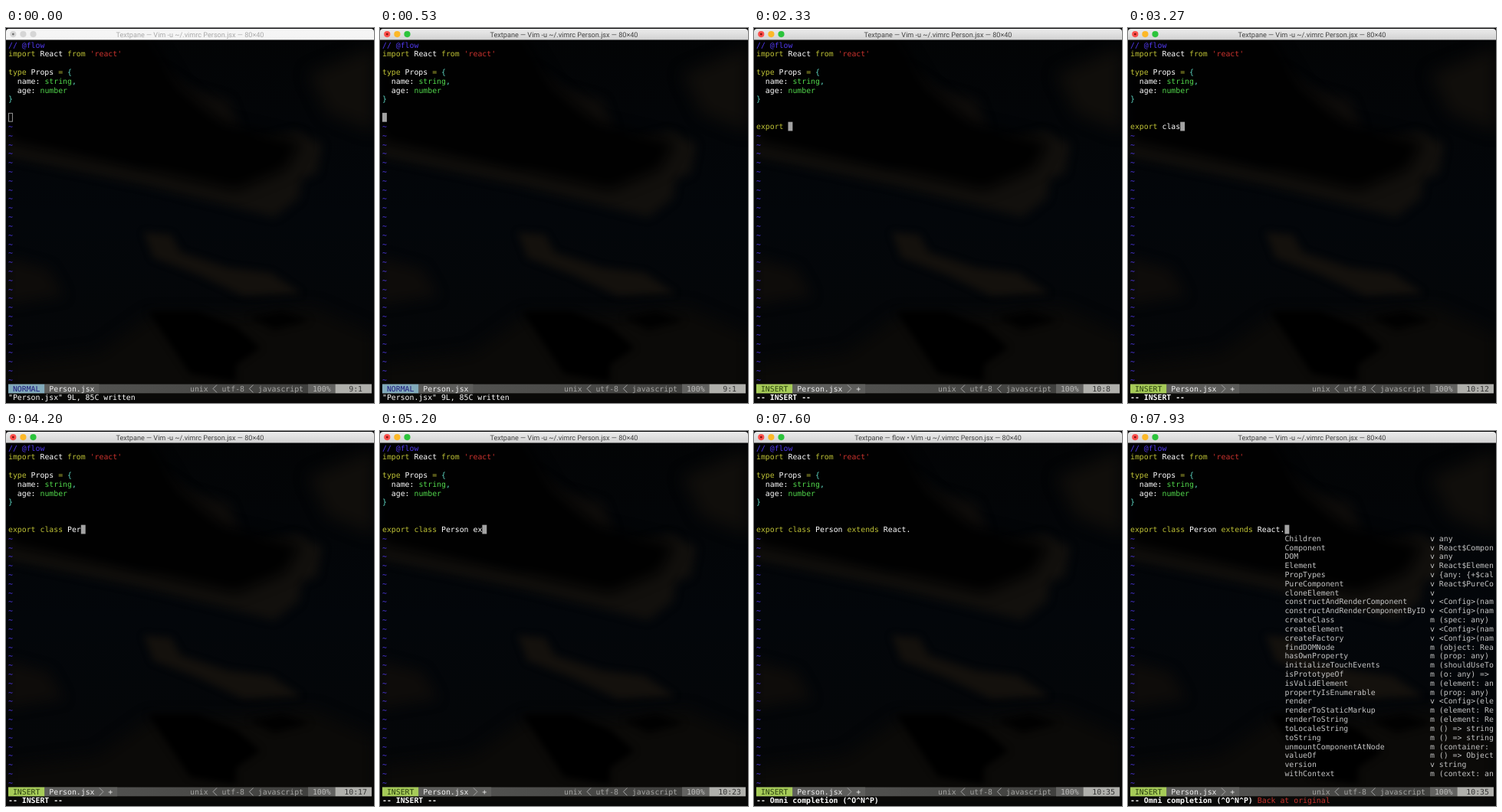
An HTML page with a canvas for the animation above (8 s loop, 480 by 490 pixels).

```html
<!DOCTYPE html>
<html lang="en">
<head>
<meta charset="utf-8">
<title>Vim completion</title>
<style>
html, body { margin: 0; width: 100%; height: 100%; overflow: hidden; background: #030303; }
canvas { display: block; }
</style>
</head>
<body>
<canvas id="stage" width="480" height="490"></canvas>
<script>
const ctx = document.getElementById('stage').getContext('2d');
const LOOP = 8000, LEFT = 3, TOP = 16.3, COL = 5.924, ROW = 11.82;
const MONO = '9.84px "DejaVu Sans Mono", monospace';
const WHITE = '#ffffff', YELLOW = '#bfc236', GREEN = '#52d84c', CYAN = '#5fd7c4',
      RED = '#cc332e', BLUE = '#523af0', GRAY = '#c4c4c4';

// Moments of the session, in ms
const FOCUS = 250, INSERT = 800, OMNI = 7330, POPUP = 7800;
const TYPED = 'export class Person extends React.';
const TYPING = [[1450, 0], [2300, 7], [4180, 16], [6220, 28], [7050, 34]];

const CODE = [
  [['// @flow', BLUE]],
  [['import ', YELLOW], ['React ', WHITE], ['from ', YELLOW], ["'react'", RED]],
  [],
  [['type ', YELLOW], ['Props ', WHITE], ['= ', YELLOW], ['{', CYAN]],
  [['  name: ', WHITE], ['string', GREEN], [',', CYAN]],
  [['  age: ', WHITE], ['number', GREEN]],
  [['}', CYAN]]
];

const COMPLETIONS = `Children v any
Component v React$Compon
DOM v any
Element v React$Elemen
PropTypes v {any: {+$cal
PureComponent v React$PureCo
cloneElement v
constructAndRenderComponent v <Config>(nam
constructAndRenderComponentByID v <Config>(nam
createClass m (spec: any)
createElement v <Config>(nam
createFactory v <Config>(nam
findDOMNode m (object: Rea
hasOwnProperty m (prop: any)
initializeTouchEvents m (shouldUseTo
isPrototypeOf m (o: any) =>
isValidElement m (element: an
propertyIsEnumerable m (prop: any)
render v <Config>(ele
renderToStaticMarkup m (element: Re
renderToString m (element: Re
toLocaleString m () => string
toString m () => string
unmountComponentAtNode m (container:
valueOf m () => Object
version v string
withContext m (context: an`.split('\n');

// Soft cloud shapes: colour, blur, outline
const CLOUDS = [
  ['#100e0b', 10, 'M395 60L480 25V135L420 112Z'],
  ['#0f0d0b', 7, 'M195 50L240 80L290 95L305 135L250 120Z'],
  ['#12100d', 6, 'M0 130L180 180L380 135L412 152L405 190L385 197L382 222L350 247L290 232L180 205L0 168Z'],
  ['#010101', 9, 'M0 0H180L225 75L285 125L385 148L365 185L300 212L200 190L0 150Z'],
  ['#14110d', 5, 'M180 267L215 270L228 293L290 313L345 320L385 347L310 350L250 322L192 300Z'],
  ['#0e0c0a', 8, 'M0 300L55 315L75 350L0 362Z'],
  ['#0b0a08', 10, 'M0 440L120 425L190 375L300 375L400 365L480 400V490H0Z'],
  ['#000000', 4, 'M185 370L250 370L300 390L332 418L300 440V462L240 452L212 410Z'],
  ['#010101', 4, 'M318 378L360 370L396 382L350 394Z']
];

const rowTop = row => TOP + (row - 1) * ROW;
const colX = col => LEFT + col * COL;

function write(text, row, col, color, bold = false) {
  ctx.font = (bold ? 'bold ' : '') + MONO;
  ctx.fillStyle = color;
  ctx.fillText(text, colX(col), rowTop(row) + 9.2);
}

function writeSpans(spans, row) {
  let col = 0;
  for (const [text, color] of spans) {
    write(text, row, col, color);
    col += text.length;
  }
}

function band(row, from, to, color) {
  ctx.fillStyle = color;
  ctx.fillRect(colX(from), rowTop(row), (to - from) * COL, ROW);
}

function paintSky() {
  const sky = document.createElement('canvas');
  sky.width = 480;
  sky.height = 490;
  const pen = sky.getContext('2d');
  const base = pen.createLinearGradient(0, 0, 0, 490);
  base.addColorStop(0, '#030405');
  base.addColorStop(0.5, '#03060a');
  base.addColorStop(1, '#050607');
  pen.fillStyle = base;
  pen.fillRect(0, 0, 480, 490);
  for (const [color, blur, outline] of CLOUDS) {
    pen.filter = `blur(${blur}px)`;
    pen.fillStyle = color;
    pen.fill(new Path2D(outline));
  }
  return sky;
}

function dot(x, radius, color) {
  ctx.fillStyle = color;
  ctx.beginPath();
  ctx.arc(x, 8.1, radius, 0, 7);
  ctx.fill();
}

function drawTitleBar(active, running) {
  const shade = ctx.createLinearGradient(0, 1, 0, 15.5);
  shade.addColorStop(0, active ? '#ececec' : '#f6f6f6');
  shade.addColorStop(1, active ? '#d2d2d2' : '#f4f4f4');
  ctx.fillStyle = shade;
  ctx.beginPath();
  ctx.roundRect(0, 1, 480, 14.5, [4, 4, 0, 0]);
  ctx.fill();
  const lights = active ? ['#fb4f4b', '#fcb827', '#2bc43b'] : Array(3).fill('#d6d6d6');
  lights.forEach((color, i) => dot(9.3 + i * 13.1, 4.1, color));
  dot(9.3, 1.4, active ? '#7c100d' : '#707070');
  ctx.font = '9.1px Roboto, sans-serif';
  ctx.textAlign = 'center';
  ctx.fillStyle = active ? '#444444' : '#aaaaaa';
  ctx.fillText(`Textpane — ${running ? 'flow • ' : ''}Vim -u ~/.vimrc Person.jsx — 80×40`, 240, 11.6);
  ctx.textAlign = 'left';
}

function chevron(col, direction) {
  const x = colX(col + 0.5), y = rowTop(39) + ROW / 2;
  ctx.strokeStyle = '#a8a8a8';
  ctx.lineWidth = 1;
  ctx.beginPath();
  ctx.moveTo(x - 2.5 * direction, y - 5);
  ctx.lineTo(x + 2.5 * direction, y);
  ctx.lineTo(x - 2.5 * direction, y + 5);
  ctx.stroke();
}

function drawStatus(inserting, line, column) {
  const middle = ctx.createLinearGradient(colX(20), 0, colX(66), 0);
  middle.addColorStop(0, '#525250');
  middle.addColorStop(1, '#40403e');
  band(39, 0, 80, middle);
  band(39, 0, 8, inserting ? '#a6cb58' : '#82abbb');
  band(39, 8, inserting ? 24 : 20, '#5e5e5c');
  band(39, 66, 72, '#636361');
  band(39, 72, 80, '#b0b0ac');
  write(inserting ? 'INSERT' : 'NORMAL', 39, 1, inserting ? '#2b4210' : '#1c1a7c');
  write('Person.jsx', 39, 9, '#eeeeee');
  if (inserting) {
    chevron(20, 1);
    write('+', 39, 22, '#eeeeee');
  }
  write('unix', 39, 40, '#a4a4a2');
  chevron(45, -1);
  write('utf-8', 39, 47, '#a4a4a2');
  chevron(53, -1);
  write('javascript', 39, 55, '#a4a4a2');
  write('100%', 39, 67, '#bcbcba');
  write(`${String(line).padStart(3)}:${column}`, 39, 73, '#353535');
}

function drawMessage(t) {
  if (t < INSERT) write('"Person.jsx" 9L, 85C written', 40, 0, WHITE);
  else if (t < OMNI) write('-- INSERT --', 40, 0, WHITE, true);
  else write('-- Omni completion (^O^N^P)', 40, 0, WHITE, true);
  if (t >= POPUP) write('Back at original', 40, 28, RED);
}

function drawCursor(row, col, solid) {
  const x = colX(col), y = rowTop(row);
  if (solid) {
    ctx.fillStyle = '#a3a3a3';
    ctx.fillRect(x, y, COL, ROW);
  } else {
    ctx.strokeStyle = '#969696';
    ctx.lineWidth = 1;
    ctx.strokeRect(x + 0.5, y + 0.5, COL - 1, ROW - 1);
  }
}

function drawPopup() {
  COMPLETIONS.forEach((entry, i) => {
    const [name, kind, ...type] = entry.split(' ');
    write(name, 11 + i, 34, GRAY);
    write(kind, 11 + i, 66, GRAY);
    write(type.join(' '), 11 + i, 68, GRAY);
  });
}

function typedCount(t) {
  for (let i = 1; i < TYPING.length; i++) {
    const [t0, n0] = TYPING[i - 1], [t1, n1] = TYPING[i];
    if (t < t1) return Math.floor(n0 + (n1 - n0) * Math.max(0, t - t0) / (t1 - t0));
  }
  return TYPED.length;
}

function draw(t) {
  const inserting = t >= INSERT, waiting = t >= OMNI && t < POPUP;
  const count = typedCount(t);
  const line = inserting ? 10 : 9;
  ctx.drawImage(sky, 0, 0);
  drawTitleBar(t >= FOCUS, waiting);
  CODE.forEach((spans, i) => writeSpans(spans, i + 1));
  for (let row = line + 1; row < 39; row++) write('~', row, 0, BLUE);
  const words = TYPED.slice(0, count).split(/(\s+)/);
  writeSpans(words.map(w => [w, /^(export|class|extends)$/.test(w) ? YELLOW : WHITE]), 10);
  if (!waiting) drawCursor(line, count, t >= FOCUS);
  if (t >= POPUP) drawPopup();
  drawStatus(inserting, line, count + 1);
  drawMessage(t);
}

const sky = paintSky();
ctx.textRendering = 'geometricPrecision';
const start = performance.now();
function tick() {
  draw((performance.now() - start) % LOOP);
  requestAnimationFrame(tick);
}
tick();
</script>
</body>
</html>
```
